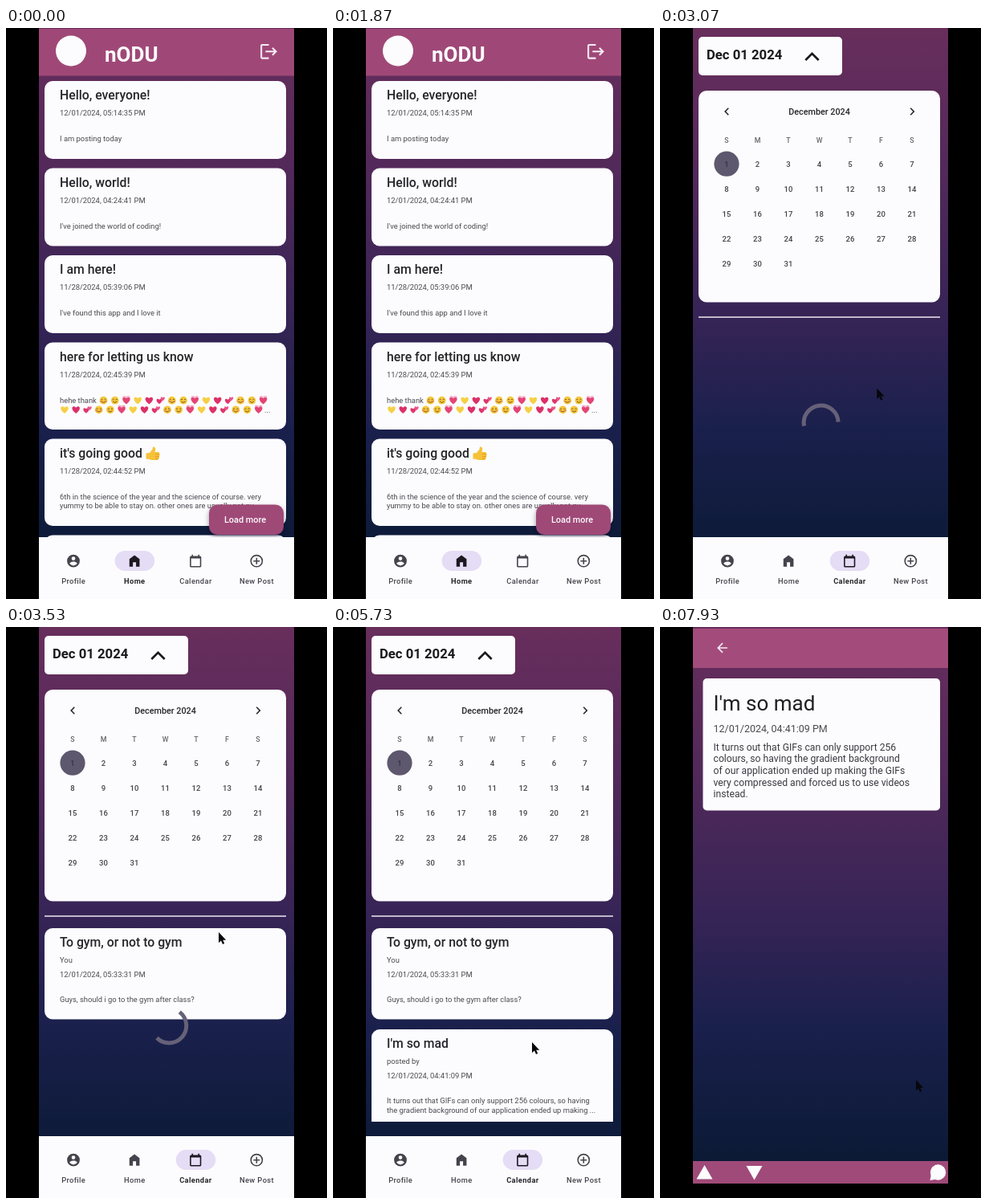
An HTML page for the animation above (8000 ms loop, 400 by 711 pixels).

```html
<!DOCTYPE html>
<html lang="en">
<head>
<meta charset="utf-8">
<title>Social app demo</title>
<style>
  html, body { margin: 0; width: 100%; height: 100%; overflow: hidden; background: #000; }
  svg { display: block; width: 100%; height: 100%; }
  text { font-family: Roboto, "Noto Sans", sans-serif; white-space: pre; }
</style>
</head>
<body>
<svg id="stage" viewBox="0 0 400 711"></svg>
<script>
const PAPER = '#fcfcfe', INK = '#26252b', SOFT = '#4a4950', ROSE = '#9f4877';
const LOOP = 8000;

const rect = (x, y, w, h, fill, r = 0, extra = '') =>
  `<rect x="${x}" y="${y}" width="${w}" height="${h}" rx="${r}" fill="${fill}" ${extra}/>`;
const text = (x, y, str, size, { fill = SOFT, weight = 400, anchor = 'start', spacing = 0 } = {}) =>
  `<text x="${x}" y="${y}" font-size="${size}" fill="${fill}" font-weight="${weight}" text-anchor="${anchor}" letter-spacing="${spacing}">${str}</text>`;
const path = (d, fill, extra = '') => `<path d="${d}" fill="${fill}" ${extra}/>`;
const line = (d, color, width) =>
  path(d, 'none', `stroke="${color}" stroke-width="${width}"`);
const group = (id, body, extra = '') => `<g id="${id}" ${extra}>${body}</g>`;
const place = (x, y, scale, body) => `<g transform="translate(${x} ${y}) scale(${scale})">${body}</g>`;
// 24-unit icon centred on a point
const icon = (x, y, scale, d, color) =>
  place(x - 12 * scale, y - 12 * scale, scale, path(d, color, 'fill-rule="evenodd"'));

const ICONS = {
  profile: 'M12 2a10 10 0 1 0 0 20a10 10 0 1 0 0-20ZM12 5a3 3 0 1 1 0 6a3 3 0 1 1 0-6ZM12 19.2C9.5 19.2 7.3 17.9 6 16C6 14 10 12.9 12 12.9S18 14 18 16C16.7 17.9 14.5 19.2 12 19.2Z',
  home: 'M12 3L4 9V21H9.5V14H14.5V21H20V9Z',
  calendar: 'M19 4H18V2H16V4H8V2H6V4H5A2 2 0 0 0 3 6V20A2 2 0 0 0 5 22H19A2 2 0 0 0 21 20V6A2 2 0 0 0 19 4ZM19 20H5V8H19Z',
  add: 'M12 2a10 10 0 1 0 0 20a10 10 0 1 0 0-20ZM12 4a8 8 0 1 1 0 16a8 8 0 1 1 0-16ZM11 7H13V11H17V13H13V17H11V13H7V11H11Z',
  logout: 'M17 7L15.6 8.4L18.2 11H8V13H18.2L15.6 15.6L17 17L22 12ZM4 5H12V3H4A2 2 0 0 0 2 5V19A2 2 0 0 0 4 21H12V19H4Z',
  back: 'M20 11H7.8L13.4 5.4L12 4L4 12L12 20L13.4 18.6L7.8 13H20Z'
};
const TABS = [['profile', 'Profile'], ['home', 'Home'], ['calendar', 'Calendar'], ['add', 'New Post']];

function nav(id, active, focus) {
  const tabs = TABS.map(([name, label], i) => {
    const x = 84 + 76.1 * i;
    const pill = i === active ? rect(x - 24.5, 651, 49.5, 25, '#e5dcf5', 12.5) : '';
    return pill + icon(x, 663.7, .79, ICONS[name], i === focus ? '#1b1820' : '#45434c') +
      text(x + .2, 692, label, 9.3, {
        fill: i === active ? INK : '#45434c', weight: i === active ? 700 : 500, anchor: 'middle', spacing: .39
      });
  });
  return group(id, rect(41, 634, 318, 77, PAPER) + tabs.join(''));
}

const HEART = 'M0 5C-8.5-1-4.5-7 0-2.8C4.5-7 8.5-1 0 5Z';
const heart = color => path(HEART, color);
const face = cheeks => `<circle r="5.1" fill="#f4c83c"/>` +
  line('M-3.3-.8Q-2.2-2.4-1.1-.8M1.1-.8Q2.2-2.4 3.3-.8M-2.7 1.4Q0 4.4 2.7 1.4', '#6b3f16', .9) +
  (cheeks ? '<circle cx="-3.4" cy="1.2" r="1.2" fill="#ee8a4c"/><circle cx="3.4" cy="1.2" r="1.2" fill="#ee8a4c"/>' : '');
const EMOJI = [
  face(true),
  face(false),
  heart('#e44474') + line('M-4.8-4.6Q-2.5-6.4 0-4.4Q2.5-6.4 4.8-4.6', '#f08ab0', 1),
  heart('#f5d045'),
  heart('#dc3068'),
  place(-1.6, 1, .75, heart('#e0356c')) + place(2.8, -2, .55, heart('#ea5588'))
];
const emojiRow = (x, y, count, first) => Array.from({ length: count },
  (_, i) => place(x + 14.22 * i, y, .95, EMOJI[(first + i) % 6])).join('');

const thumb = place(183, 530, 1,
  path('M-8.5-.5L-4-1L-.5-5.5L0-8.5Q3-9 3.3-5.5L2.6-2H7Q9-1.5 8.2.5Q9.2 2 8 3.5Q8.6 5 7.2 6Q7.2 8 5 8H-1.5Q-4 6.5-8.5 6.5Z', '#f6c23a') +
  line('M3 .7H8M3 3.6H7.8M3 6.2H7', '#d9931e', .8));

const title = (y, str) => text(67, y, str, 15.8, { fill: INK, weight: 500 });
const small = (y, str) => text(67, y, str, 9.4);

function post(y, h, heading, date, lines) {
  return rect(48, y, 301, h, PAPER, 10) + title(y + 23.3, heading) + small(y + 43.4, date) +
    lines.map((str, i) => small(y + 75.3 + 11.4 * i, str)).join('');
}

const homeScreen = group('home',
  rect(41, 1, 318, 58.5, ROSE) +
  `<circle cx="81" cy="28.5" r="19" fill="${PAPER}"/>` +
  text(123, 41.5, 'nODU', 26, { fill: PAPER, weight: 700 }) +
  icon(327.5, 29.3, 1.04, ICONS.logout, '#f6eaf4') +
  post(66, 97, 'Hello, everyone!', '12/01/2024, 05:14:35 PM', ['I am posting today']) +
  post(174.5, 97, 'Hello, world!', '12/01/2024, 04:24:41 PM', ["I've joined the world of coding!"]) +
  post(283, 97, 'I am here!', '11/28/2024, 05:39:06 PM', ["I've found this app and I love it"]) +
  post(391.5, 108.5, 'here for letting us know', '11/28/2024, 02:45:39 PM', ['hehe thank']) +
  emojiRow(121.5, 463.7, 15, 0) + emojiRow(73, 475.3, 18, 3) + text(322, 478.6, '...', 9.4) +
  post(511.5, 108.5, "it's going good", '11/28/2024, 02:44:52 PM', [
    '6th in the science of the year and the science of course. very',
    'yummy to be able to stay on. other ones are usually not qu...']) + thumb +
  rect(48, 631.5, 301, 40, PAPER, 10) +
  rect(253, 593.5, 93, 37.5, ROSE, 10.5, 'filter="url(#shadow)"') +
  text(298, 616, 'Load more', 10.9, { fill: PAPER, weight: 500, anchor: 'middle' }));

function monthGrid() {
  const cell = (col, y, str, size, fill = '#424148') =>
    text(83 + 38.5 * col, y, str, size, { fill, anchor: 'middle', weight: 500 });
  let out = [...'SMTWTFS'].map((d, i) => cell(i, 142.7, d, 8.8, '#68666e')).join('');
  out += '<circle cx="83" cy="169.2" r="15.6" fill="#5e586e"/>';
  for (let day = 1; day <= 31; day++) {
    const i = day - 1;
    out += cell(i % 7, 172.6 + 31 * Math.floor(i / 7), day, 9.5, day === 1 ? '#35313f' : undefined);
  }
  return out;
}

function datedPost(id, y, h, heading, author, date, lines) {
  return group(id, rect(48, y, 301, h, PAPER, 10) + title(y + 23.2, heading) + small(y + 43.4, author) +
    small(y + 61, date) + lines.map((str, i) => small(y + 92.2 + 11.4 * i, str)).join(''));
}

const calendarScreen = group('calendar',
  rect(48, 11, 179, 48, PAPER, 5) +
  text(58, 38.8, 'Dec 01 2024', 16.7, { fill: '#1a191e', weight: 700 }) +
  line('M181.3 40L189.5 31.8L197.7 40', '#1a191e', 2.7) +
  rect(48, 78, 301, 263.5, PAPER, 10) +
  line('M85.3 99.8L81.2 104L85.3 108.2M312.2 99.8L316.3 104L312.2 108.2', INK, 1.6) +
  text(198.5, 107.7, 'December 2024', 10.8, { fill: INK, weight: 500, anchor: 'middle' }) +
  monthGrid() +
  rect(48, 359.2, 301, 1.7, '#d8d2de') +
  `<g clip-path="url(#listClip)">${group('list',
    datedPost('postA', 375, 113.5, 'To gym, or not to gym', 'You', '12/01/2024, 05:33:31 PM',
      ['Guys, should i go to the gym after class?']) +
    datedPost('postB', 501, 124.5, "I'm so mad", 'posted by', '12/01/2024, 04:41:09 PM', [
      'It turns out that GIFs can only support 256 colours, so having',
      'the gradient background of our application ended up making ...']))}</g>` +
  group('spinner', line('M21.5 0A21.5 21.5 0 1 1 -21.3 3', '#666079', 5)));

const detailLines = ['It turns out that GIFs can only support 256', 'colours, so having the gradient background',
  'of our application ended up making the GIFs', 'very compressed and forced us to use videos', 'instead.'];
const detailScreen = group('detail',
  rect(41, 2, 318, 49, '#a34c7b') + icon(77.5, 26, .8, ICONS.back, '#f6eaf4') +
  rect(53.5, 64, 295.5, 164.5, PAPER, 5) +
  text(66.5, 104, "I'm so mad", 26, { fill: '#1f1e24' }) +
  text(66.5, 130.8, '12/01/2024, 04:41:09 PM', 12.5) +
  detailLines.map((str, i) => text(66.5, 153.8 + 14.6 * i, str, 12.2, { fill: '#3b3a42' })).join('') +
  rect(41, 665, 318, 28, '#a04a79') + rect(41, 693, 318, 18, '#000') +
  path('M55.5 670L65.5 687.5H45.5ZM117.5 688.5L107.5 671H127.5Z', PAPER) +
  `<circle cx="346.5" cy="679" r="9.7" fill="${PAPER}"/>` + path('M338 681L336.5 689L345 687.5Z', PAPER));

const GRADIENT = [[0, '#682e5c'], [.25, '#52295a'], [.5, '#372456'], [.7, '#1a204c'], [1, '#07182f']];

document.getElementById('stage').innerHTML = `<defs>
  <linearGradient id="dusk" x1="0" y1="0" x2="0" y2="1">${GRADIENT.map(([o, c]) => `<stop offset="${o}" stop-color="${c}"/>`).join('')}</linearGradient>
  <clipPath id="listClip"><rect x="41" y="368" width="318" height="248"/></clipPath>
  <filter id="shadow" x="-20%" y="-30%" width="140%" height="180%"><feDropShadow dx="0" dy="3" stdDeviation="3" flood-color="#101028" flood-opacity=".4"/></filter>
  </defs>` +
  rect(0, 0, 400, 711, '#000') + rect(41, 0, 318, 711, 'url(#dusk)') +
  homeScreen + calendarScreen +
  nav('navHome', 1, 1) + nav('navPressed', 1, 2) + nav('navCalendar', 2, 2) + detailScreen +
  group('cursor', path('M0 0V13.2L3 10.5L5 15L7.2 14L5.2 9.7H9.2Z', '#07070b'));

const el = id => document.getElementById(id);
const show = (id, on) => el(id).setAttribute('display', on ? 'inline' : 'none');
const move = (id, x, y, angle = 0) => el(id).setAttribute('transform', `translate(${x} ${y}) rotate(${angle})`);
const ease = p => p * p * (3 - 2 * p);

// [time, x, y]
const CURSOR = [[2000, 352, 600], [2420, 242, 664], [2520, 242, 664], [2600, 286, 654], [3300, 265, 380],
  [4400, 265, 380], [5200, 248, 517], [6000, 248, 517], [6700, 218, 552], [7450, 218, 552], [7850, 319, 564]];
const SCROLL = [[6150, 0, 0], [6500, 0, -16]];

function sample(keys, t) {
  const next = keys.findIndex(k => k[0] > t);
  if (next < 0) return keys.at(-1).slice(1);
  if (next === 0) return keys[0].slice(1);
  const [a, b] = [keys[next - 1], keys[next]];
  const p = ease((t - a[0]) / (b[0] - a[0]));
  return [a[1] + (b[1] - a[1]) * p, a[2] + (b[2] - a[2]) * p];
}

const PRESS = 2550, OPEN = 2670, FIRST = 3470, LOADED = 3670, DETAIL = 7730;

function draw(t) {
  const inCalendar = t >= OPEN && t < DETAIL;
  show('home', t < OPEN);
  show('calendar', inCalendar);
  show('detail', t >= DETAIL);
  show('navHome', t < PRESS);
  show('navPressed', t >= PRESS && t < OPEN);
  show('navCalendar', inCalendar);
  show('postA', t >= FIRST);
  show('postB', t >= LOADED);
  show('spinner', t < LOADED);
  show('cursor', t >= CURSOR[0][0]);
  move('list', ...sample(SCROLL, t));
  move('spinner', 201, 494.5, -45 + (t - 3530) * .3);
  move('cursor', ...sample(CURSOR, t));
}

const start = performance.now();
function tick() {
  draw((performance.now() - start) % LOOP);
  requestAnimationFrame(tick);
}
tick();
</script>
</body>
</html>
```
